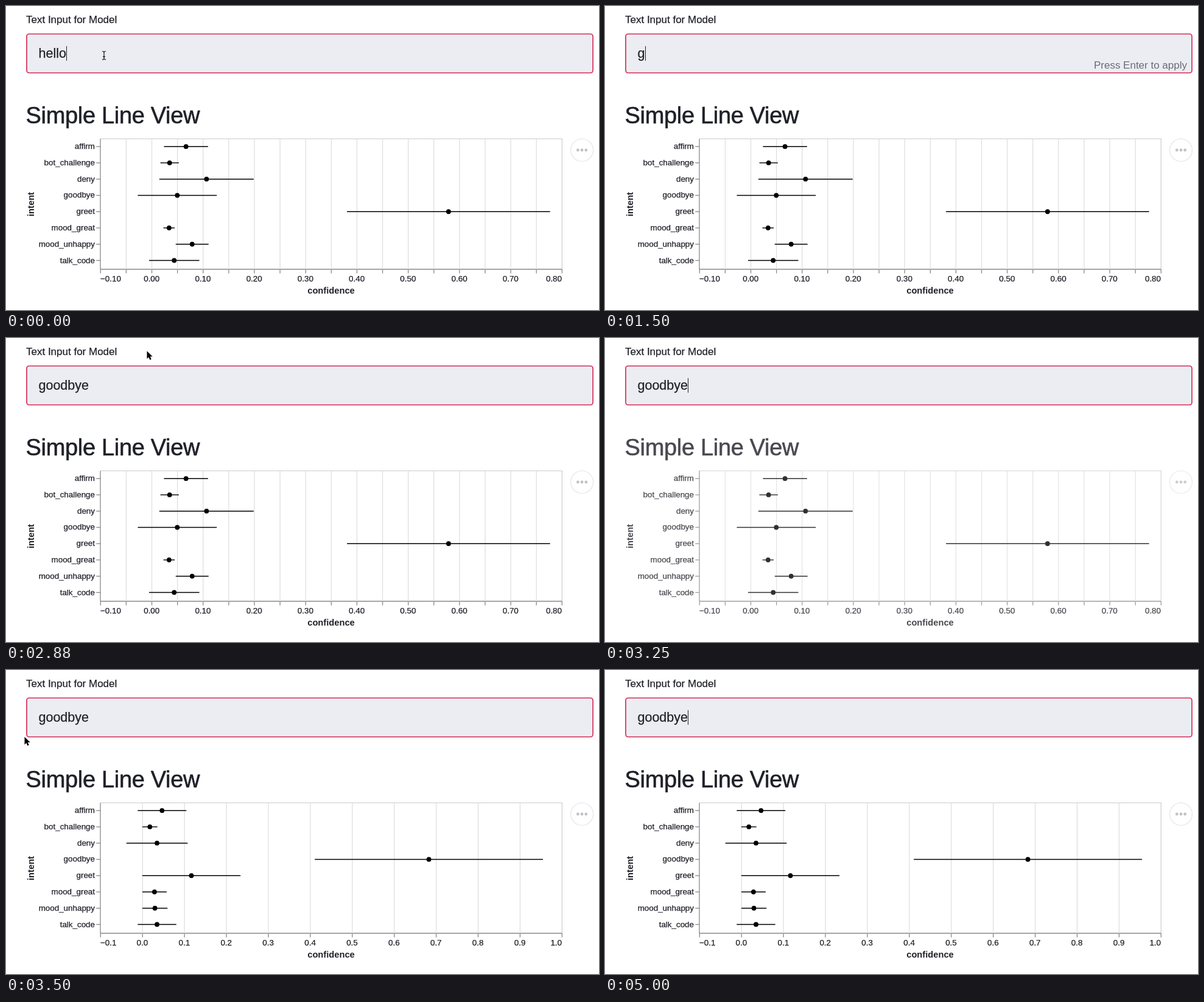
An HTML page that plays this animation: 974 px wide and 500 px high, repeating every 5370 ms.

```html
<!DOCTYPE html>
<html lang="en">
<head>
<meta charset="utf-8">
<title>Text input and line view</title>
<style>
  html, body { margin: 0; width: 100%; height: 100%; overflow: hidden; background: #fff; }
  svg { display: block; width: 974px; height: 500px; font-family: "Liberation Sans", Arial, sans-serif; fill: #1f2028; }
  text { stroke: #1f2028; stroke-width: .25; }
  .heading { font-size: 38px; letter-spacing: -.32px; stroke-width: .6; }
  .label { font-size: 13.4px; }
  .title { font-size: 14.7px; font-weight: bold; text-anchor: middle; stroke: none; }
  .hint { font-size: 17px; text-anchor: end; fill: #6a6b72; stroke: none; }
  .grid { stroke: #ddd; stroke-width: 1.2; }
  .axis { stroke: #888; stroke-width: 1.3; }
  .mark { stroke: #000; stroke-width: 1.4; }
  .dot { fill: #000; }
</style>
</head>
<body>
<svg viewBox="0 0 974 500">
  <text x="33" y="28" font-size="17">Text Input for Model</text>
  <rect x="34" y="46" width="930" height="64" rx="4" fill="#ecedf2" stroke="#d52c58" stroke-width="1.7"/>
  <rect id="selection" x="54" y="66" width="45" height="24" fill="#d4d5d7"/>
  <text id="entry" x="53.5" y="85" font-size="21.5"></text>
  <rect id="caret" y="66" width="1" height="24"/>
  <text id="hint" class="hint" x="956" y="103">Press Enter to apply</text>

  <g id="view">
    <text class="heading" x="32.5" y="192.5">Simple Line View</text>
    <g id="frame"></g>
    <g id="before"></g>
    <g id="after"></g>
    <text class="title" x="534" y="473">confidence</text>
    <text class="title" transform="translate(46 326) rotate(-90)">intent</text>
    <circle cx="946" cy="237" r="18.5" fill="#fff" stroke="#e4e4e7" stroke-width="1.2"/>
    <g fill="#c1c2c7">
      <circle cx="939.3" cy="237" r="2.4"/><circle cx="946" cy="237" r="2.4"/><circle cx="952.7" cy="237" r="2.4"/>
    </g>
  </g>

  <path id="beam" d="M-3-6.8Q0-6.8 0-5Q0-6.8 3-6.8M0-5V5M-3 6.8Q0 6.8 0 5Q0 6.8 3 6.8M-2 2H2" fill="none" stroke="#111" stroke-width="1.2"/>
  <path id="arrow" d="M.5.5V13.2L3.4 10.5L5.3 15L7.7 14L5.8 9.6H9.7Z" fill="#000" stroke="#fff" paint-order="stroke"/>
</svg>
<script>
const LOOP = 5370, TICK = 125, BLINK = 500;
const TYPE_START = 1500, TYPE_END = 2000, FADE_START = 3000, RESULT = 3500;
const LEFT = 155, RIGHT = 913, TOP = 218.5, BOTTOM = 433, MIN = -0.1;

// Mean confidence and spread per intent; a lone mean is its own spread.
const hello = {
  affirm: [.067, .043], bot_challenge: [.035, .018], deny: [.107, .092], goodbye: [.05, .077],
  greet: [.579, .198], mood_great: [.034, .011], mood_unhappy: [.079, .032], talk_code: [.044, .049]
};
const goodbye = {
  affirm: [.047, .058], bot_challenge: [.018], deny: [.035, .073], goodbye: [.683, .272],
  greet: [.117], mood_great: [.029], mood_unhappy: [.03], talk_code: [.035, .046]
};

const $ = id => document.getElementById(id);
const clamp = u => Math.min(1, Math.max(0, u));
const progress = (t, from, to) => clamp((t - from) / (to - from));
const rowY = i => 231.2 + 26.76 * i;
const line = (cls, x1, y1, x2, y2) => `<line class="${cls}" x1="${x1}" y1="${y1}" x2="${x2}" y2="${y2}"/>`;
const label = (x, y, anchor, text) => `<text class="label" x="${x}" y="${y}" text-anchor="${anchor}">${text}</text>`;
const show = (id, on) => $(id).setAttribute("visibility", on ? "visible" : "hidden");
const move = (id, x, y) => $(id).setAttribute("transform", `translate(${x} ${y})`);

function chart(data, max, steps, digits) {
  const toX = value => LEFT + (RIGHT - LEFT) * (value - MIN) / (max - MIN);
  let out = "";
  for (let i = 0; i <= steps; i++) {
    const value = MIN + (max - MIN) * i / steps;
    const x = toX(value) + .3;
    if (i && i < steps) out += line("grid", x, TOP, x, BOTTOM);
    out += line("axis", x, BOTTOM, x, BOTTOM + 6.7);
    const tenths = Math.round(value * 100) / 10;
    if (!Number.isInteger(tenths)) continue;
    const anchor = i === 0 ? "start" : i === steps ? "end" : "middle";
    out += label(toX(value), 453, anchor, (tenths / 10).toFixed(digits).replace("-", "\u2212"));
  }
  Object.values(data).forEach(([mean, spread = mean], i) => {
    const y = rowY(i);
    out += line("mark", toX(mean - spread), y, toX(mean + spread), y);
    out += `<circle class="dot" cx="${toX(mean)}" cy="${y}" r="3.9"/>`;
  });
  return out;
}

$("frame").innerHTML =
  `<path d="M${LEFT} ${TOP}H${RIGHT + .3}V${BOTTOM}" fill="none" stroke="#ccc" stroke-width="1.2"/>` +
  Object.keys(hello).map((name, i) =>
    line("axis", 148.3, rowY(i), LEFT, rowY(i)) + label(146, rowY(i) + 4, "end", name)).join("") +
  line("axis", LEFT, TOP, LEFT, BOTTOM) + line("axis", LEFT, BOTTOM, RIGHT, BOTTOM);
$("before").innerHTML = chart(hello, .8, 18, 2);
$("after").innerHTML = chart(goodbye, 1, 11, 1);

function typedText(t) {
  if (t < TYPE_START) return "hello";
  return "goodbye".slice(0, Math.round(1 + 6 * progress(t, TYPE_START, TYPE_END)));
}

function caretOn(t) {
  if (t < TYPE_START) return t < 750 && Math.floor((t + 375) / BLINK) % 2 === 0;
  return t < TYPE_END + BLINK || Math.floor(t / BLINK) % 2 === 0;
}

function draw(time) {
  // The whole picture advances in even ticks.
  const t = Math.floor(time / TICK) * TICK;
  const entry = $("entry");
  const text = typedText(t);
  if (entry.textContent !== text) {
    entry.textContent = text;
    $("caret").setAttribute("x", Math.round(53.6 + entry.getComputedTextLength()));
  }
  show("caret", caretOn(t));
  show("selection", t >= 750 && t < TYPE_START);
  show("hint", t >= TYPE_START && t < 2250);

  const slide = progress(t, 0, 250);
  move("beam", 161 + 32.3 * slide, 81.3 + 4 * slide);
  show("beam", t < TYPE_START);

  const done = t >= RESULT;
  move("arrow", done ? 30 : 231, done ? 109.5 : 21);
  show("arrow", t === 2875 || t === RESULT);
  $("view").setAttribute("opacity", done ? 1 : 1 - .28 * progress(t, FADE_START, 3375));
  show("before", !done);
  show("after", done);
}

const start = performance.now();
function tick() {
  draw((performance.now() - start) % LOOP);
  requestAnimationFrame(tick);
}
tick();
</script>
</body>
</html>
```
